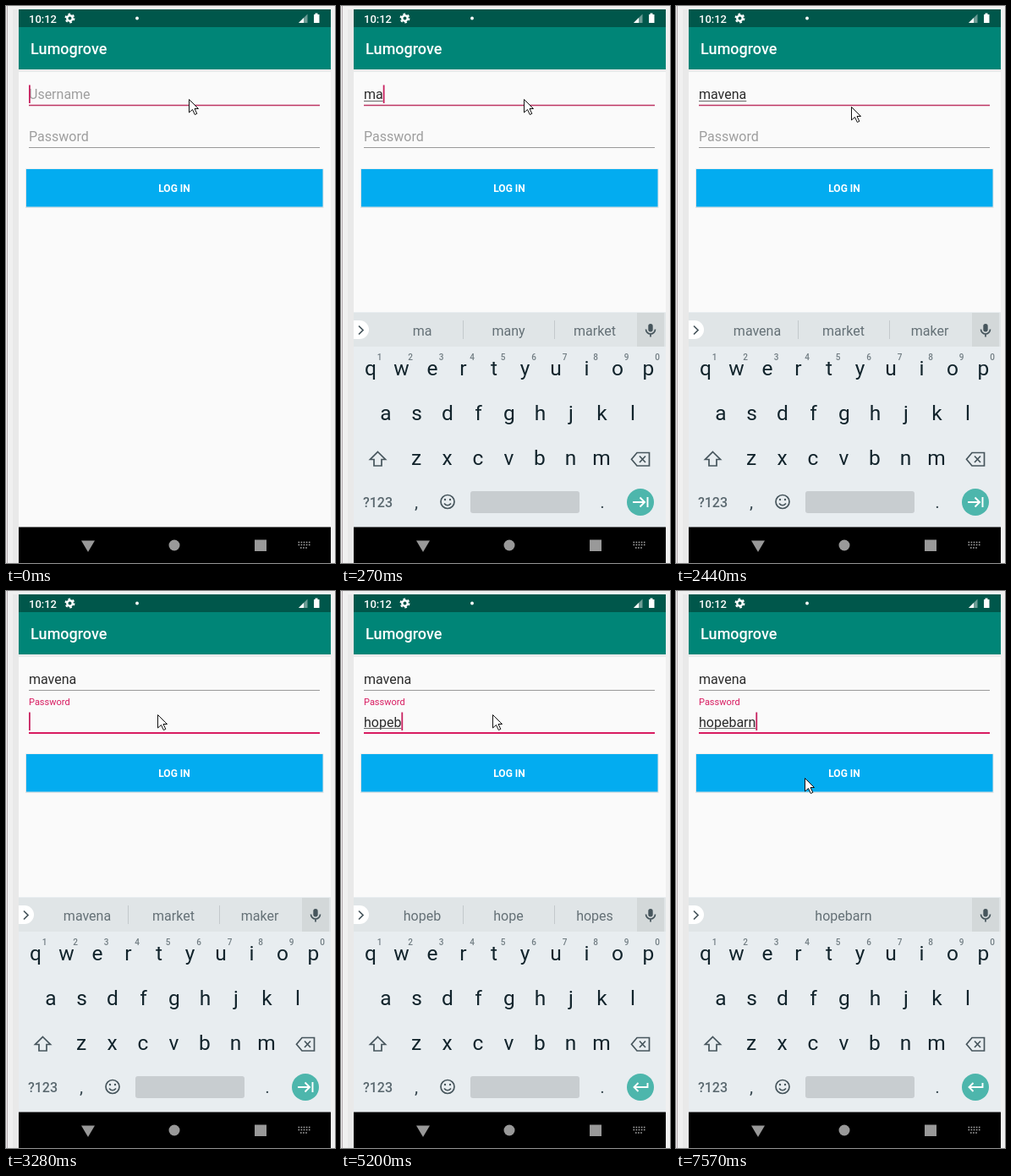
An HTML page for the animation above (8 s loop, 389 by 659 pixels).

```html
<!DOCTYPE html>
<html lang="en">
<head>
<meta charset="utf-8">
<style>
html, body { margin: 0; width: 389px; height: 659px; overflow: hidden; background: #f0f0f0; }
svg { display: block; font-family: Roboto, sans-serif; }
.hint { font-size: 16px; fill: #9e9e9e; }
.value { font-size: 16px; fill: #2b2b2b; }
.mid { text-anchor: middle; }
.key { font-size: 24.5px; fill: #12242c; }
.mark { font-size: 21px; fill: #37474f; }
.digit { font-size: 10px; font-weight: 500; fill: #717d83; }
.word { font-size: 16px; fill: #647076; }
.icon { fill: none; stroke: #46555c; stroke-width: 1.7; }
</style>
</head>
<body>
<svg width="389" height="659" viewBox="0 0 389 659">
  <path d="M1.5 0V659" stroke="#b5acaf"/>
  <path d="M8 4h7v655H8z" fill="#e9e9e9"/>
  <path d="M15 75h369v542H15z" fill="#fafafa"/>
  <path d="M15 75h369v3H15z" fill="#e9ebeb"/>
  <path d="M15 4h369v21H15z" fill="#00574b"/>
  <path d="M15 25h369v50H15z" fill="#008577"/>

  <!-- Status bar -->
  <text x="27" y="19.5" font-size="13" font-weight="500" fill="#fff">10:12</text>
  <g stroke="#fff" fill="none">
    <circle cx="75.5" cy="14.5" r="3.2" stroke-width="2.4"/>
    <circle cx="75.5" cy="14.5" r="5" stroke-width="2" stroke-dasharray="2.6 2.636"/>
  </g>
  <circle cx="155" cy="14.5" r="1.9" fill="#fff"/>
  <path d="M356.5 9.500V20H346z" fill="#6d9c95"/>
  <path d="M352 14v6h-6z" fill="#fff"/>
  <path d="M365.500 8.500h3v1.500h2v10h-6.500V10h1.500z" fill="#fff"/>
  <text x="29" y="57" font-size="18" font-weight="500" fill="#fff">Lumogrove</text>

  <!-- Form -->
  <text id="userHint" class="hint" x="27" y="110">Username</text>
  <text id="user" class="value" x="27" y="110"></text>
  <path id="userLine"/>
  <text id="passHint" x="27">Password</text>
  <text id="pass" class="value" x="27" y="160.500"></text>
  <path id="passLine"/>
  <path id="compose" stroke="#666"/>
  <rect id="caret" width="1.8" height="21.500" fill="#c8215f"/>
  <path d="M23 192.500h352.500v46.500H23z" fill="#dfe3e5"/>
  <path d="M24 193h350.500v44.500H24z" fill="#03acf0"/>
  <text class="mid" x="199" y="220" font-size="12" font-weight="700" fill="#fff">LOG IN</text>

  <!-- Keyboard -->
  <g id="keyboard">
    <path d="M15 362h369v255H15z" fill="#e8edf0"/>
    <path d="M15 363h369v40H15z" fill="#e0e5e7"/>
    <path d="M350 363h32v40h-32z" fill="#d3d8d9"/>
    <path d="M15 372h7a11 11 0 0 1 0 22h-7z" fill="#fff"/>
    <path d="M21 378.500l5 5-5 5" class="icon" stroke-width="2"/>
    <rect x="363.300" y="376" width="5.400" height="9.500" rx="2.700" fill="#46555c"/>
    <path d="M360.500 382.500a5.500 5.500 0 0 0 11 0M366 388v3.500" class="icon"/>
    <path id="bars" d="M144.500 372v22M252.500 372v22" stroke="#c3c9cc"/>
    <g id="words" class="word mid"></g>
    <g id="keys" class="mid"></g>
    <path d="M43.500 527.500l9 9h-4.500v7.500h-9v-7.500h-4.500z" class="icon"/>
    <path d="M350 528.500h14.500v15.500H350l-6.500-7.750zM353 532.500l7 7.500m0-7.500l-7 7.500" class="icon"/>
    <text class="mid" x="43.500" y="592.500" font-size="16" font-weight="500" fill="#5b6970">?123</text>
    <circle cx="126" cy="586.500" r="8" class="icon"/>
    <path d="M122 588.500q4 4.500 8 0" class="icon"/>
    <circle cx="123" cy="584" r="1.200" fill="#46555c"/>
    <circle cx="129" cy="584" r="1.200" fill="#46555c"/>
    <rect x="153" y="574" width="129" height="26" rx="3" fill="#c8cdd0"/>
    <circle cx="354" cy="587" r="16" fill="#4db6ac"/>
    <path id="enter" fill="none" stroke="#fff" stroke-width="1.900"/>
  </g>

  <!-- Navigation bar -->
  <path d="M15 616.500h369V659H15z"/>
  <g fill="#999">
    <path d="M89 632.500h16l-8 13.500z"/>
    <circle cx="199" cy="638" r="6.500"/>
    <path d="M294 631.500h14v13.500h-14z"/>
  </g>
  <path d="M345.500 634.500h14M345.500 637.500h14M348 641h9" stroke="#aaa" stroke-width="1.600" stroke-dasharray="1.600 1.500"/>

  <path id="mouse" d="M.5.500V16l4-3.500 2.800 6 2.500-1.100-2.800-5.900h4.500z" fill="#fff" stroke="#111"/>
</svg>
<script>
const LOOP = 8000;
const $ = id => document.getElementById(id);
const text = (x, y, kind, s) => `<text x="${x}" y="${y}" class="${kind}">${s}</text>`;
const row = (letters, x, y, kind = 'key') =>
  [...letters].map((c, i) => text(x + i * 36.5, y, kind, c)).join('');

$('keys').innerHTML = row('qwertyuiop', 35, 437) + row('1234567890', 45.5, 419, 'digit') +
  row('asdfghjkl', 53, 490) + row('zxcvbnm', 89, 543) +
  text(89, 594, 'mark', ',') + text(309, 594, 'mark', '.');

// Mouse position between two stops
const START = [216, 110], FIELD = [179, 146], BUTTON = [152, 221];
const between = (a, b, k) => a.map((v, i) => Math.round(v + (b[i] - v) * k));

// Each step lists only what changes at that time
const steps = [
  [0, { user: '', pass: '', focus: 'user', caret: true, keyboard: false, words: '', mouse: START, next: true }],
  [150, { user: 'm', keyboard: true, words: 'm my me' }],
  [270, { user: 'ma', words: 'ma many market' }],
  [550, { user: 'mav', words: 'mav may made' }],
  [840, { user: 'mave', words: 'mave make maker' }],
  [1250, { user: 'maven', words: 'maven market maker' }],
  [1760, { user: 'mavena', words: 'mavena market maker' }],
  [2160, { caret: false }],
  [2440, { mouse: between(START, FIELD, .25) }],
  [2570, { mouse: between(START, FIELD, .7) }],
  [2700, { mouse: FIELD, caret: true }],
  [2840, { pressed: true }],
  [3280, { focus: 'pass', pressed: false }],
  [3420, { next: false }],
  [3570, { words: '' }],
  [4110, { pass: 'h', words: 'h he have' }],
  [4410, { pass: 'ho' }],
  [4530, { words: 'ho how home' }],
  [4650, { pass: 'hop', words: 'hop hope shop' }],
  [4800, { pass: 'hope', words: 'hope hopes hoped' }],
  [5080, { pass: 'hopeb', words: 'hopeb hope hopes' }],
  [5250, { pass: 'hopeba', words: 'hopeba' }],
  [5420, { pass: 'hopebar', words: 'hopebar' }],
  [5600, { pass: 'hopebarn' }],
  [5750, { words: 'hopebarn' }],
  [6170, { caret: false }],
  [6320, { mouse: between(FIELD, BUTTON, .3) }],
  [6470, { mouse: between(FIELD, BUTTON, .8) }],
  [6620, { mouse: BUTTON, caret: true }],
  [7150, { caret: false }],
  [7570, { caret: true }],
];

const show = (id, on) => $(id).setAttribute('visibility', on ? 'inherit' : 'hidden');
const set = (id, attrs) => {
  for (const k in attrs) $(id).setAttribute(k, attrs[k]);
};
const underline = (id, y, active, weight, color) => set(id, {
  d: `M27 ${y}H371`, stroke: active ? color : '#999', 'stroke-width': active ? weight : 1,
});

function draw(s) {
  const onUser = s.focus === 'user';
  $('user').textContent = s.user;
  $('pass').textContent = s.pass;
  show('userHint', !s.user);
  underline('userLine', 117.5, onUser, 1.5, '#bd3563');
  underline('passLine', onUser && !s.pressed ? 167.5 : 168, !onUser || s.pressed, 1.8, '#d81b60');
  set('passHint', onUser
    ? { y: 159.5, 'font-size': 16, fill: '#9e9e9e' }
    : { y: 135, 'font-size': 11, fill: '#d81b60' });

  const width = s[s.focus] ? $(s.focus).getComputedTextLength() : 0;
  set('compose', { d: `M27 ${onUser ? 112.5 : 162.5}h${width}` });
  show('compose', width);
  set('caret', { x: 27 + width, y: onUser ? 93.5 : 143.5 });
  show('caret', s.caret);

  const words = s.words ? s.words.split(' ') : [];
  show('keyboard', s.keyboard);
  show('bars', words.length > 1);
  $('words').innerHTML = words.map((w, i) =>
    text(words.length > 1 ? 96 + i * 102 : 198, 389.5, '', w)).join('');
  set('enter', { d: s.next
    ? 'M345 587h14m-5.500-5.500l5.500 5.500-5.500 5.500M362.500 581v12'
    : 'M362.500 582v5H346.500m5-5l-5 5 5 5' });
  set('mouse', { transform: `translate(${s.mouse})` });
}

let shown = -1;
function tick() {
  const t = performance.now() % LOOP;
  const count = steps.filter(([at]) => at <= t).length;
  if (count !== shown) {
    shown = count;
    draw(Object.assign({}, ...steps.slice(0, count).map(([, change]) => change)));
  }
  requestAnimationFrame(tick);
}
tick();
</script>
</body>
</html>
```
